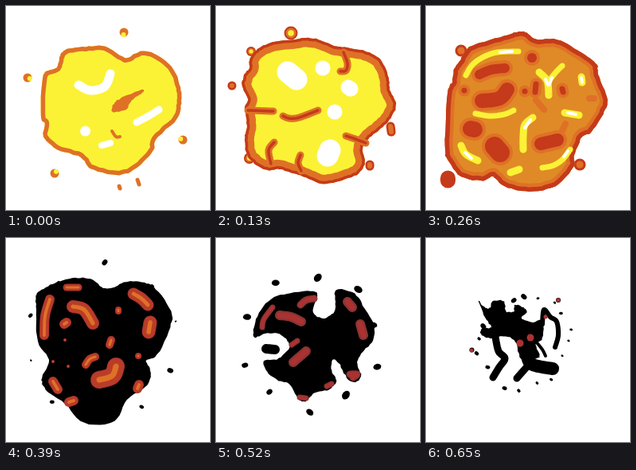
Write an HTML page with a canvas that moves like this. It is 256 px wide and 256 px high and loops after 780 ms.

```html
<!DOCTYPE html>
<html lang="en">
<head>
<meta charset="utf-8">
<title>Explosion</title>
<style>
  html, body { margin: 0; height: 100%; overflow: hidden; background: #fff; }
  canvas { display: block; width: 100vw; height: 100vh; image-rendering: pixelated; }
</style>
</head>
<body>
<canvas id="stage" width="256" height="256"></canvas>
<script>
const ctx = document.getElementById('stage').getContext('2d');
const STEP = 130;
const WHITE = '#fff', YELLOW = '#fbf236', ORANGE = '#df7126', AMBER = '#df8a26',
      RED = '#c43a1a', EMBER = '#b93c28', DARK = '#ac3232', ASH = '#8a3434', BLACK = '#000';

let seed = 1;
function random() {
  seed = seed * 16807 % 2147483647;
  return seed / 2147483647;
}
const vary = amount => (random() * 2 - 1) * amount;

// Smooth curve through "x,y x,y ..." with a slightly shaky hand
function curve(text, closed, shake = 0) {
  const pts = text.split(' ').map(p => p.split(',').map(Number));
  const n = pts.length, path = new Path2D(), parts = 6;
  const at = i => closed ? pts[(i + n) % n] : pts[Math.max(0, Math.min(n - 1, i))];
  path.moveTo(...pts[0]);
  for (let i = 0; i < (closed ? n : n - 1); i++) {
    const [a, b, c, d] = [at(i - 1), at(i), at(i + 1), at(i + 2)];
    for (let k = 1; k <= parts; k++) {
      const t = k / parts;
      const [x, y] = [0, 1].map(j => b[j] + t / 2 * (c[j] - a[j]
        + t * (2 * a[j] - 5 * b[j] + 4 * c[j] - d[j] + t * (3 * (b[j] - c[j]) + d[j] - a[j]))));
      path.lineTo(x + vary(shake), y + vary(shake));
    }
  }
  if (closed) path.closePath();
  else path.lineTo(at(n - 1)[0] + .01, at(n - 1)[1]);
  return path;
}

// Filled outline; rings are [color, depth] bands inside its edge
function blob(color, text, ...rings) {
  const path = curve(text, true, .6);
  ctx.save();
  ctx.fillStyle = color;
  ctx.fill(path);
  ctx.clip(path);
  for (const [ring, depth] of rings) {
    ctx.strokeStyle = ring;
    ctx.lineWidth = depth * 2;
    ctx.stroke(path);
  }
  ctx.restore();
}

// Round-ended strokes; a single point gives a dot
function lines(color, width, ...paths) {
  ctx.strokeStyle = color;
  ctx.lineWidth = width;
  for (const p of paths) ctx.stroke(curve(p));
}

// Soot specks spread evenly around a circle
function debris(count, radius, spread, small, large) {
  ctx.fillStyle = BLACK;
  for (let i = 0; i < count; i++) {
    const a = -1.53 + i * Math.PI * 2 / count + vary(.06), r = radius + vary(spread);
    const size = small + (large - small) * random();
    ctx.beginPath();
    ctx.ellipse(122 + r * Math.cos(a), 130 + r * Math.sin(a), size, size * .75, vary(1), 0, 7);
    ctx.fill();
  }
}

function flash() {
  blob(YELLOW, '68,62 76,54 100,51 125,51 150,65 165,58 182,58 208,76 219,102 220,122 214,142 188,168 184,183 160,206 138,212 106,204 94,190 64,180 47,164 49,148 44,138 46,90 53,81 64,77', [ORANGE, 5.5]);
  lines(WHITE, 11, '91,99 106,106 124,101 131,85');
  lines(WHITE, 9, '164,146 179,138 192,130');
  lines(WHITE, 13, '99.5,157');
  lines(WHITE, 8, '120,175 131,172');
  blob(ORANGE, '134,133 134,125 142,117 170,105 171,109 158,118 150,130');
  lines(ORANGE, 4, '133,157 138,164 143,164');
  lines(ORANGE, 5, '142,226 143,229', '165,218 167,224');
  // Sparks glow on the side facing the blast
  for (const [x, y] of [[148, 33], [27, 90], [61, 210], [222, 168]]) {
    const a = Math.atan2(130 - y, 130 - x);
    lines(ORANGE, 11, `${x},${y}`);
    lines(YELLOW, 6, `${x + 3 * Math.cos(a)},${y + 3 * Math.sin(a)}`);
  }
}

function fireball() {
  for (const [size, at] of [[17, '94,34'], [12, '44,57'], [14, '42,191']]) {
    lines(RED, size, at);
    lines(ORANGE, size - 4, at);
    lines(YELLOW, size / 2 - 1, at);
  }
  lines(RED, 11, '20,100', '193,199 193,201', '219,151 220,158');
  lines(ORANGE, 6, '20,100', '193,199 193,201', '219,151 220,158');
  blob(YELLOW, '51,55 66,47 104,41 125,41 148,50 164,52 189,57 206,67 216,87 218,105 226,122 221,138 209,152 193,165 184,178 187,196 179,210 159,218 134,223 109,214 94,209 79,205 66,206 54,202 39,187 36,165 39,150 36,128 40,118 33,100 36,85 42,78 42,68', [ORANGE, 11.5], [RED, 3.5]);
  const creases = ['156,82 163,81 165,72 160,58', '40,131 72,132', '84,138 92,141 104,140 128,131',
    '163,163 175,167 188,172', '73,171 66,181 69,198', '106,187 103,197 107,207'];
  lines(ORANGE, 9, ...creases);
  lines(RED, 3.5, ...creases);
  lines(WHITE, 27, '90,83 101,92', '143,181 140,188');
  lines(WHITE, 19, '134,78', '149,133', '166,102 169,104');
}

function cooling() {
  lines(RED, 15, '44,56', '193,199');
  lines(ORANGE, 9, '44,56', '193,199');
  lines(RED, 19, '27.5,216 27.5,219');
  blob(AMBER, '50,56 62,48 98,38 112,33 125,33 138,42 165,42 190,55 213,72 216,86 227,115 224,132 208,158 196,164 186,188 185,202 162,226 130,233 98,226 84,214 72,219 44,214 27,192 24,176 27,110 33,95 35,80 42,70', [ORANGE, 10], [RED, 5.5]);
  lines(ORANGE, 8, '205,116 211,116', '175,148 169,160', '138,118 148,130');
  const patches = [
    [12, '67,86 82,80 99,78'], [18, '70,119 92,116 102,105'], [20, '56,154 61,155'],
    [24, '86,176 93,184'], [16, '144,173 165,168'], [12, '133,65'],
    [7, '48,106', '138,98 137,108', '124,107', '171,104 172,108']
  ];
  for (const [w, ...p] of patches) lines(ORANGE, w + 8, ...p);
  for (const [w, ...p] of patches) lines(RED, w, ...p);
  lines(YELLOW, 7, '50,87 58,74 72,64 90,58 116,57', '154,94 164,82 171,75',
    '62,135 80,138 98,136 110,131', '146,203 160,200 172,192 181,180');
  lines(YELLOW, 9, '142,83 152,94 154,112', '134,140 124,149 122,164 122,180',
    '174,134 192,137', '44,175 50,186 65,194', '195,89 196,96', '106,209 117,205');
  lines(WHITE, 4, '93,58 108,57', '150,92 154,99 158,90', '131,143 124,153',
    '178,134 188,136', '49,184 57,191', '173,189 178,182', '195,90 196,96');
}

function smoke() {
  blob(BLACK, '38,72 50,62 68,54 90,50 108,52 122,63 136,62 150,55 170,55 188,64 207,92 206,112 190,146 176,154 181,166 178,184 152,203 136,230 98,232 74,208 50,190 45,175 54,153 40,130 38,90');
  const embers = [
    [12, '48,122 49,98 55,77'], [9, '76,62 91,62'], [16, '84,86 98,90 109,107'],
    [12, '73,108 76,106', '59,180 65,190', '79,206 85,204', '167,184 165,189'],
    [15, '160,70 170,76 178,84'], [17, '181,106 179,118'], [22, '117,178 133,173 138,161'],
    [10, '100,159 105,152 112,149', '130,134 132,128'], [8, '141,90 141,92', '166,148'],
    [4, '74,128', '59,155', '78,161']
  ];
  for (const [w, ...p] of embers) {
    lines(DARK, w, ...p);
    lines(EMBER, w - 2, ...p);
    lines(ORANGE, w * .32, ...p);
  }
  debris(10, 96, 5, 1, 4.5);
}

function breakup() {
  blob(BLACK, '47,118 52,98 69,76 94,69 122,67 127,73 122,93 134,101 147,94 150,83 151,65 174,70 186,88 198,108 197,128 184,143 177,158 182,173 174,181 164,175 154,157 146,153 145,166 151,179 142,190 124,194 112,205 102,200 92,183 79,179 66,170 60,155 79,151 92,138 89,128 78,120 62,120 49,125');
  lines(BLACK, 12, '63,139 74,140');
  const embers = [
    [7, '58,112 60,102 71,87', '95,134 102,129', '139,186 145,183', '105,200 113,201'],
    [9, '106,84 113,78 123,76', '168,171 177,171 172,175'],
    [12, '80,97 94,99 107,105', '97,156 113,142', '165,80 171,87', '181,108 185,122']
  ];
  for (const [w, ...p] of embers) {
    lines(ASH, w, ...p);
    lines(DARK, w * .6, ...p);
  }
  debris(10, 85, 7, 4, 6);
}

function scraps() {
  blob(BLACK, '66,79 72,86 80,88 84,79 98,80 100,92 110,92 112,84 124,88 126,94 120,100 132,106 146,104 146,126 138,134 142,150 120,152 112,130 98,123 84,126 70,122 70,114 82,112 74,100');
  lines(BLACK, 6, '146,108 148,90 156,99 164,105 166,122 162,137');
  lines(BLACK, 9, '87,124 91,142 99,151 92,162 84,175', '128,160 114,176');
  lines(BLACK, 16, '126,142 132,158 159,164');
  lines(BLACK, 4, '138,130 146,140 150,148');
  debris(20, 58, 6, 1.5, 4);
  lines(BLACK, 6, '57.5,140.5', '166,78');
  lines(DARK, 5, '57,141', '166,78', '150,99');
  lines(DARK, 9, '118,132', '131,125');
}

const poses = [flash, fireball, cooling, smoke, breakup, scraps];
let shown = -1;

function tick() {
  const i = Math.floor(performance.now() / STEP) % poses.length;
  if (i !== shown) {
    shown = i;
    seed = 4242 + i * 97;
    ctx.fillStyle = WHITE;
    ctx.fillRect(0, 0, 256, 256);
    poses[i]();
  }
  requestAnimationFrame(tick);
}

ctx.lineCap = ctx.lineJoin = 'round';
tick();
</script>
</body>
</html>
```
